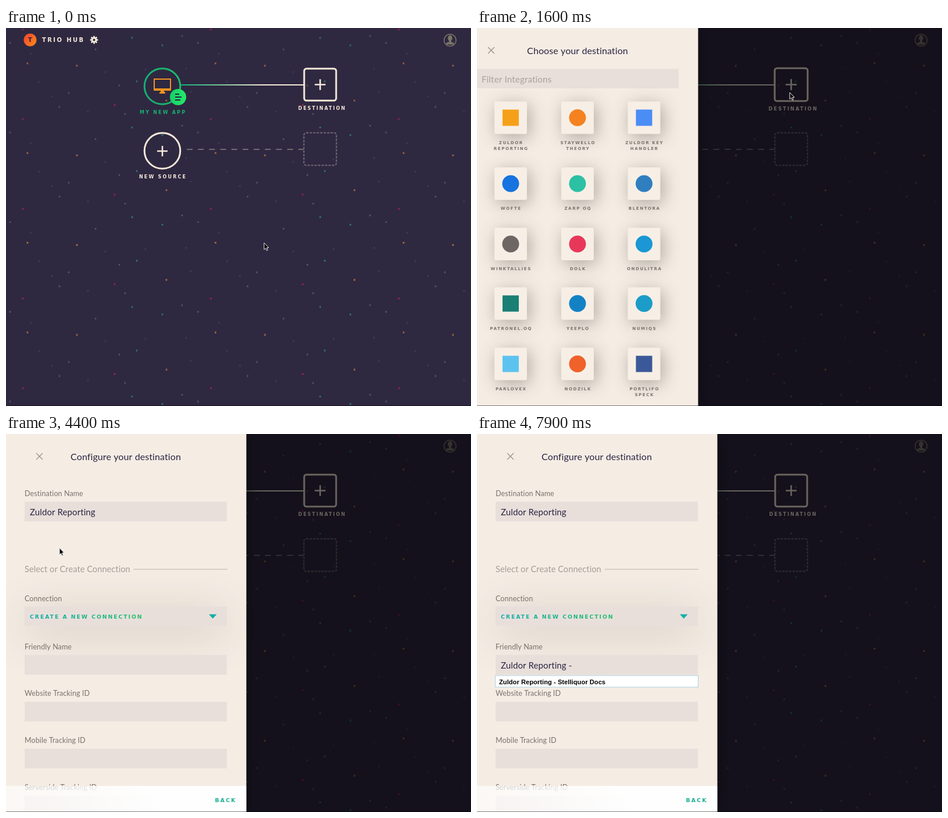
An HTML page with a canvas that plays this animation: 800x651 px, repeating every 8 s.

```html
<!DOCTYPE html>
<html lang="en">
<head>
<meta charset="utf-8">
<title>Choose a destination</title>
<style>
html, body { margin: 0; width: 800px; height: 651px; overflow: hidden; background: #2f2841; }
canvas { display: block; }
</style>
</head>
<body>
<canvas id="stage" width="800" height="651"></canvas>
<script>
const ctx = document.getElementById('stage').getContext('2d');
const LOOP = 8000, STEP = 100, PANEL_W = 413.5;
const CREAM = '#f5e9d8', INK = '#2b2440', FIELD = '#e8dfdb', LABEL = '#7b716d';
const WIDE = '"DejaVu Sans", sans-serif', ROUND = 'Lato, sans-serif';
const NAME = 'Zuldor Reporting';

const clamp = v => Math.max(0, Math.min(1, v));
const ramp = (t, from, to) => clamp((t - from) / (to - from));
const smooth = u => u * u * (3 - 2 * u);
const inOut = u => u < .5 ? 2 * u * u : 1 - 2 * (1 - u) ** 2;

function text(str, x, y, size, color, { font = ROUND, gap = .1, center = false, weight = '' } = {}) {
  ctx.font = `${weight} ${size}px ${font}`;
  ctx.letterSpacing = gap + 'px';
  ctx.textAlign = center ? 'center' : 'left';
  ctx.fillStyle = color;
  ctx.fillText(str, center ? x + gap / 2 : x, y);
}
const caps = (str, x, y, size, color, gap, center) =>
  text(str, x, y, size, color, { font: WIDE, weight: 'bold', gap, center });

function line(color, width, ...pts) {
  ctx.strokeStyle = color;
  ctx.lineWidth = width;
  ctx.beginPath();
  for (let i = 0; i < pts.length; i += 4) {
    ctx.moveTo(pts[i], pts[i + 1]);
    ctx.lineTo(pts[i + 2], pts[i + 3]);
  }
  ctx.stroke();
}
function box(x, y, w, h, color, r = 0) {
  ctx.fillStyle = color;
  ctx.beginPath();
  ctx.roundRect(x, y, w, h, r);
  ctx.fill();
}
function disc(x, y, r, color, ry = r) {
  ctx.fillStyle = color;
  ctx.beginPath();
  ctx.ellipse(x, y, r, ry, 0, 0, 7);
  ctx.fill();
}
function ring(x, y, r, color, width) {
  ctx.strokeStyle = color;
  ctx.lineWidth = width;
  ctx.beginPath();
  ctx.arc(x, y, r, 0, 7);
  ctx.stroke();
}
function frame(x, y, size, color, width) {
  ctx.strokeStyle = color;
  ctx.lineWidth = width;
  ctx.beginPath();
  ctx.roundRect(x - size / 2, y - size / 2, size, size, 4);
  ctx.stroke();
}
function polygon(pts) {
  ctx.beginPath();
  pts.forEach(([x, y]) => ctx.lineTo(x, y));
  ctx.closePath();
}
function gradient(x0, y0, x1, y1, ...colors) {
  const g = ctx.createLinearGradient(x0, y0, x1, y1);
  colors.forEach((c, i) => g.addColorStop(i / (colors.length - 1), c));
  return g;
}
const plus = (x, y, r) => line(CREAM, 2.6, x - r, y, x + r, y, x, y - r, x, y + r);
function shadow(color, blur, dx = 0, dy = 0) {
  ctx.shadowColor = color;
  ctx.shadowBlur = blur;
  ctx.shadowOffsetX = dx;
  ctx.shadowOffsetY = dy;
}
function layer(alpha, draw) {
  ctx.save();
  ctx.globalAlpha *= alpha;
  draw();
  ctx.restore();
}

// One tile of the repeating starfield, grouped by colour.
const TILE_W = 323.5, TILE_H = 154.4;
const STARS = {
  '#b8763c': [[37, 61], [122, 65], [276, 125]],
  '#a3294f': [[29, 2.6], [187, 132.6]],
  '#2a8578': [[217, 17], [225, 92], [269, 30]],
  '#5d566a': [[7, 25.6], [195, 99], [92, 136], [303, 14], [108, 112], [205, 148], [154, 37]],
  '#453d57': [[57, 93], [43, 44], [141, 144], [318, 110], [171, 76], [240, 72], [79, 118], [310, 70]]
};
function starfield() {
  box(0, 0, 800, 651, '#2f2841');
  for (const [color, spots] of Object.entries(STARS))
    for (const [sx, sy] of spots)
      for (let x = sx; x < 800; x += TILE_W)
        for (let y = sy; y < 651; y += TILE_H)
          line(color, 1.1, x - 1.3, y - 1.3, x + 1.3, y + 1.3, x - 1.3, y + 1.3, x + 1.3, y - 1.3);
}

function header() {
  disc(41.5, 20.5, 11, gradient(31, 12, 52, 30, '#f4432f', '#ff8a1c'));
  caps('T', 41.5, 24.3, 10, INK, 0, true);
  caps('TRIO HUB', 62, 24.3, 10, CREAM, 2.4);
  for (let i = 0; i < 4; i++) {
    const a = i * Math.PI / 4, c = 6.8 * Math.cos(a), s = 6.8 * Math.sin(a);
    line(CREAM, 2.6, 151.5 - c, 20.5 - s, 151.5 + c, 20.5 + s);
  }
  ring(151.5, 20.5, 3.5, CREAM, 3);
  disc(151.5, 20.5, 2, '#2f2841');

  const grey = '#7b7569';
  ring(764, 21, 10.3, grey, 1.5);
  disc(764, 17.5, 3.8, grey, 5);
  box(762, 20, 4, 6, grey);
  box(757.5, 24.5, 13, 4, grey, [4, 4, 2, 2]);
}

function appNode() {
  ring(269, 100.5, 30.8, gradient(238, 100, 300, 100, '#15ad73', '#1bbd68'), 3);
  const orange = '#f2931f';
  ctx.strokeStyle = orange;
  ctx.lineWidth = 2;
  ctx.strokeRect(255, 88, 28, 18);
  box(254, 104, 30, 4, orange, 1);
  box(266, 108, 6, 3, orange);
  box(264, 110.5, 10, 2.5, orange);
  disc(296, 119, 14, gradient(282, 119, 310, 119, '#18cf68', '#22ea69'));
  line(INK, 2.2, 291, 114, 298, 114, 291, 119, 302, 119, 291, 124, 300, 124);
  caps('MY NEW APP', 269, 147.8, 8, '#17b06f', 2.2, true);
}

function workspace(hover) {
  starfield();
  header();
  line(gradient(301, 0, 512, 0, '#10b27b', '#7cc99a', CREAM, CREAM), 1.8, 301, 98, 512, 98);
  appNode();

  ctx.save();
  ctx.translate(540.5, 97.5);
  ctx.scale(1 + .03 * hover, 1 + .03 * hover);
  frame(0, 0, 55, CREAM, 3);
  plus(0, 0, 9.3);
  caps('DESTINATION', 2.5, 43.2, 8, CREAM, 2, true);
  ctx.restore();

  ring(269, 211.5, 30.8, CREAM, 3);
  plus(269, 212, 9);
  caps('NEW SOURCE', 269, 258.8, 8, CREAM, 2.2, true);
  ctx.setLineDash([10, 9.2]);
  line('#716b72', 2, 311, 209, 512, 209);
  ctx.setLineDash([4, 2]);
  frame(540.5, 208.5, 56, '#716b72', 2);
  ctx.setLineDash([]);
}

const INTEGRATIONS = [
  ['ZULDOR REPORTING', '#f6a01a', 'square'], ['STAYWELLO THEORY', '#f58220', 'circle'], ['ZULDOR KEY|HANDLER', '#4a8df5', 'square'],
  ['WOFTE', '#1673e0', 'circle'], ['ZARP OQ', '#2cc0a4', 'circle'], ['BLENTORA', '#2f7fc0', 'circle'],
  ['WINKTALLIES', '#6d6662', 'circle'], ['DOLK', '#e8385a', 'circle'], ['ONDULITRA', '#1a97d4', 'circle'],
  ['PATRONEL.OQ', '#1a7f74', 'square'], ['YEEPLO', '#1382c5', 'circle'], ['NUMIQS', '#1c9cc8', 'circle'],
  ['PARLOVEX', '#5cc3f0', 'square'], ['NODZILK', '#f0622a', 'circle'], ['PORTLIFO SPECK', '#3b5998', 'square']
];
const COLUMNS = [91, 206, 320.5], ROWS = [154.5, 268, 372, 474.5, 578.5];

function panelTitle(str) {
  line('#9b918b', 1.3, 52, 33, 63, 44, 52, 44, 63, 33);
  text(str, 206, 44.5, 16, INK, { center: true });
}

function chooser() {
  panelTitle('Choose your destination');
  box(32, 70.5, 348, 33.5, FIELD);
  text('Filter Integrations', 41, 93.5, 15, '#aa9f9c', { gap: .2 });
  INTEGRATIONS.forEach(([name, color, shape], i) => {
    const x = COLUMNS[i % 3], y = ROWS[Math.floor(i / 3)];
    ctx.save();
    shadow('rgba(75,68,62,.42)', 30, 4, 6);
    box(x - 28, y - 28, 56, 56, '#f7efe6', 3);
    ctx.restore();
    if (shape === 'circle') disc(x, y, 14.5, color);
    else box(x - 14, y - 14, 28, 28, color);
    const words = name.includes('|') ? name.split('|') : name.length > 12 ? name.split(' ') : [name];
    words.forEach((w, k) => caps(w, x, y + 45.4 + k * 10.5, 7, '#7a716b', 1.6, true));
  });
}

function field(label, y) {
  text(label, 32, y - 10, 12.5, LABEL);
  box(32, y, 348, 34, FIELD);
}

function form(typed) {
  panelTitle('Configure your destination');
  field('Destination Name', 116.5);
  text(NAME, 41, 140, 15, INK);
  text('Select or Create Connection', 32, 238, 14.5, '#a59b97');
  line('#d9cec8', 2, 219.5, 233, 381, 233);

  ctx.save();
  shadow('rgba(105,95,85,.3)', 75, 0, 12);
  box(32, 297, 348, 33.5, FIELD);
  ctx.restore();
  text('Connection', 32, 287.5, 12.5, LABEL);
  caps('CREATE A NEW CONNECTION', 41, 318, 9.3, gradient(41, 0, 240, 0, '#12aca8', '#22bd68'), 1.95);
  polygon([[349, 310.5], [362.5, 310.5], [355.7, 318]]);
  ctx.fillStyle = '#14aea6';
  ctx.fill();

  field('Friendly Name', 380.5);
  field('Website Tracking ID', 461.3);
  field('Mobile Tracking ID', 542);
  field('Serverside Tracking ID', 623);
  if (typed) {
    text(typed, 41, 403.5, 15, INK);
    box(31, 415.5, 350, 21, '#a9d0e2');
    box(32, 416.5, 348, 19, '#fff');
    text(NAME + ' - Stelliquor Docs', 38, 430.5, 11, '#000',
      { font: '"Liberation Sans", Arial, sans-serif', weight: 'bold' });
  }
  box(0, 606, PANEL_W, 45, gradient(0, 0, 260, 0, 'rgba(255,255,255,.62)', 'rgba(255,255,255,.97)'));
  caps('BACK', 359.5, 634.3, 9.3, '#18b092', 2.2);
}

function panel(t) {
  const right = PANEL_W * inOut(ramp(t, 1300, 1675));
  box(0, 0, 800, 651, `rgba(0,0,0,${.57 * ramp(t, 1300, 1470)})`);
  ctx.save();
  ctx.translate(right - PANEL_W, 0);
  ctx.save();
  shadow('rgba(0,0,0,.4)', 26);
  box(0, 0, PANEL_W, 651, '#f5ede4');
  ctx.restore();
  ctx.beginPath();
  ctx.rect(0, 0, PANEL_W, 651);
  ctx.clip();
  const swap = ramp(t, 3350, 3650);
  if (swap < 1) layer(1 - swap, chooser);
  const typed = (NAME + ' - ').slice(0, Math.max(0, Math.floor((t - 5950) / 103)));
  if (swap > 0) layer(swap, () => form(typed));
  ctx.restore();
}

const PATH = [
  [0, 444, 370], [950, 538, 111], [1900, 538, 111], [2000, 518, 115],
  [3100, 84, 170], [4100, 84, 170], [5500, 152, 393], [LOOP, 152, 393]
];
function pointer(t) {
  if (t >= 6050) return;
  const i = PATH.findIndex(p => p[0] > t);
  const [t0, x0, y0] = PATH[i - 1], [t1, x1, y1] = PATH[i];
  const u = smooth(ramp(t, t0, t1));
  const x = x0 + (x1 - x0) * u, y = y0 + (y1 - y0) * u;
  if (t > 4100 && y > 380) {
    line('#1c1824', 1.2, x, y - 3, x, y + 4, x - 3, y - 3, x + 3, y - 3);
    return;
  }
  ctx.save();
  ctx.translate(x, y);
  polygon([[0, 0], [0, 11.5], [2.6, 9.2], [4.4, 13.2], [6.3, 12.4], [4.6, 8.5], [8, 8.3]]);
  ctx.fillStyle = '#000';
  ctx.fill();
  ctx.strokeStyle = '#eee';
  ctx.lineWidth = 1;
  ctx.stroke();
  ctx.restore();
}

function draw(t) {
  workspace(ramp(t, 950, 1150) - ramp(t, 1930, 2080));
  if (t >= 1300) panel(t);
  box(0, 650, 800, 1, 'rgba(0,0,0,.5)');
  pointer(t);
}

const start = performance.now();
function tick() {
  const t = (performance.now() - start) % LOOP;
  draw(Math.floor(t / STEP) * STEP);
  requestAnimationFrame(tick);
}
tick();
</script>
</body>
</html>
```
